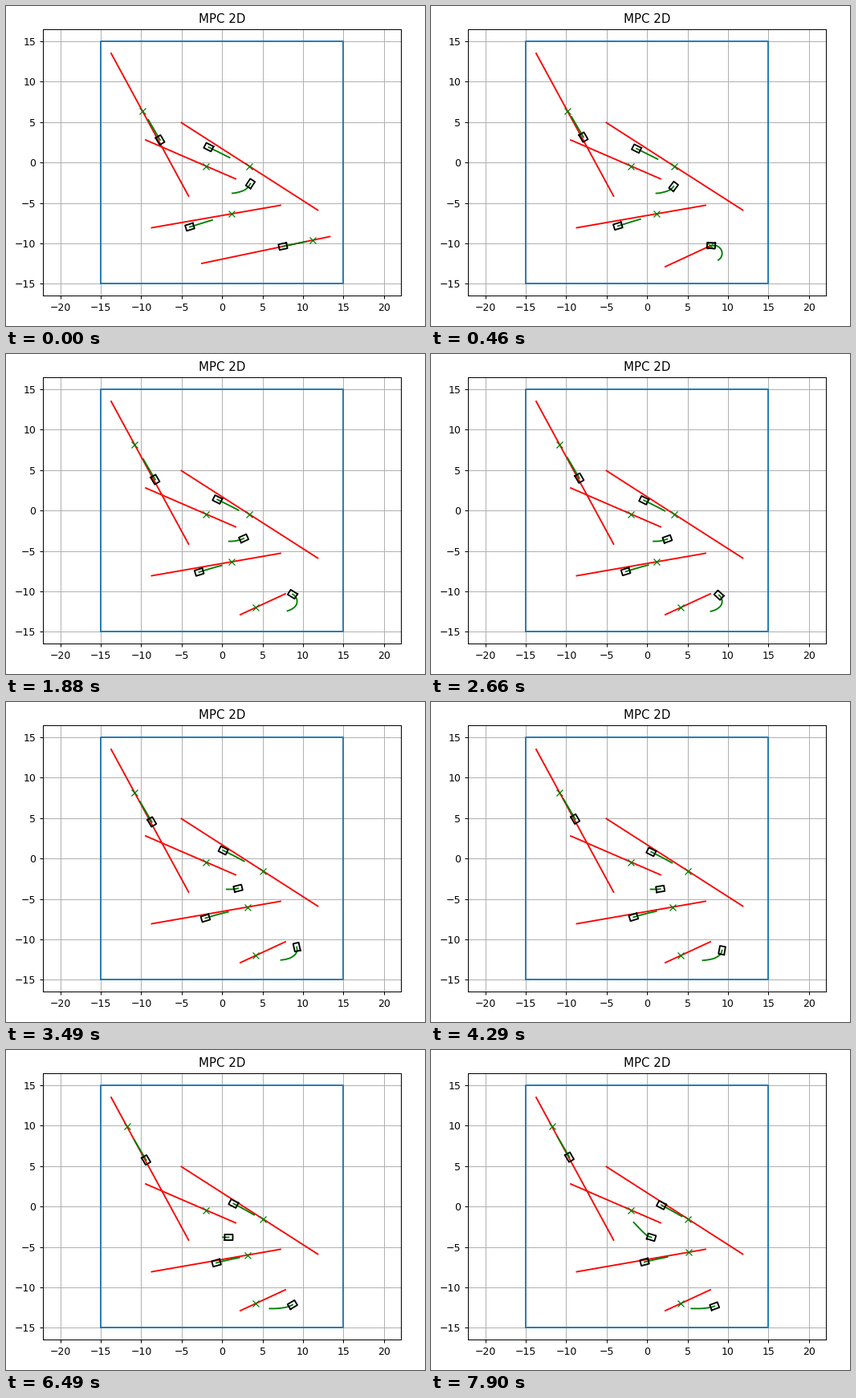
Recreate the animation shown at these times as a matplotlib script. Size 522x399 px, loop 8000 ms.

```python
import numpy as np
import matplotlib.pyplot as plt
from matplotlib.animation import FuncAnimation

W, H, DPI = 522, 399, 90
LOOP, TICK = 8000, 40
STEPS = 20
SPEED, HORIZON = 0.202, 2.9      # travel per step, length of the predicted path
SPACING, NEAR = 2.0, 3.7         # waypoint spacing, distance that picks the next one
LENGTH, WIDTH = 1.0, 0.7

# The solver slows down towards the end, so steps come at uneven times (ms)
step_times = np.interp(np.arange(1, STEPS), [1, 6, 14, 17, 19],
                       [50, 1880, 5110, 6490, 7900])


def smooth(points):
    """Curve through the points, with the distance travelled along it."""
    p = np.array(points, float)
    m = np.gradient(p, axis=0)
    t = np.linspace(0, 1, 40)[:, None]
    curve = np.vstack([
        (1 + 2 * t) * (1 - t) ** 2 * a + t * (1 - t) ** 2 * ma
        + t * t * (3 - 2 * t) * b + t * t * (t - 1) * mb
        for a, b, ma, mb in zip(p, p[1:], m, m[1:])])
    dist = np.r_[0, np.cumsum(np.hypot(*np.diff(curve, axis=0).T))]
    return curve, dist


def outline(center, heading):
    c, s = np.cos(heading), np.sin(heading)
    box = np.array([[1, 1], [1, -1], [-1, -1], [-1, 1], [1, 1]]) * [LENGTH / 2, WIDTH / 2]
    return box @ np.array([[c, s], [-s, c]]) + center


def drive(first, last, route, goal, track, braking=False):
    """States (route, goal, plan, body) for the steps first..last-1."""
    route = np.array(route)
    ahead = route[1] - route[0]
    ahead = ahead / np.hypot(*ahead)
    curve, dist = smooth(track)
    states = []
    for n in range(last - first):
        s = 0.21 * n - 0.0016 * n * n if braking else SPEED * n
        tip = min(s + HORIZON, 2.65 + 0.07 * n) if braking else s + HORIZON
        span = np.linspace(s, tip, 25)
        plan = np.column_stack([np.interp(span, dist, axis) for axis in curve.T])
        dx, dy = plan[1] - plan[0]

        mark = route[0] + ahead * SPACING * goal
        if n and np.hypot(*(mark - plan[0])) < NEAR:
            goal += 1
            mark = mark + ahead * SPACING
        states.append((route, mark[None], plan, outline(plan[0], np.arctan2(dy, dx))))
    return states


crossing = [(1.67, -2.02), (-9.44, 2.79)]
robots = [
    drive(0, STEPS, [(-4.14, -4.15), (-13.71, 13.5)], 6,
          [(-7.66, 2.79), (-11.09, 8.66)]),
    drive(0, STEPS, [(-5.03, 4.93), (11.83, -5.89)], 5,
          [(-1.66, 1.90), (1.82, 0.15), (4.35, -1.25)]),
    drive(0, STEPS, [(-8.70, -8.07), (7.22, -5.29)], 5,
          [(-3.99, -7.97), (-0.37, -6.88), (2.55, -6.23)]),
    # brakes into the corner, then plans a way back to its route
    drive(0, 19, crossing, 2,
          [(3.50, -2.61), (3.15, -3.11), (2.66, -3.46), (1.91, -3.70),
           (1.27, -3.80), (0.0, -3.80)], braking=True)
    + drive(19, STEPS, crossing, 2,
            [(0.53, -3.80), (0.0, -3.60), (-0.80, -2.85), (-1.80, -1.80)]),
    # reaches the end of its route and turns round for a new one
    drive(0, 2, [(-2.50, -12.48), (13.32, -9.16)], 7,
          [(7.52, -10.37), (11.40, -9.57)])
    + drive(2, STEPS, [(7.82, -10.30), (2.26, -12.88)], 0,
            [(7.92, -10.27), (8.71, -10.35), (9.23, -10.95), (9.13, -11.74),
             (8.31, -12.34), (6.90, -12.60), (5.30, -12.62)]),
]

fig = plt.figure(figsize=(W / DPI, H / DPI), dpi=DPI, facecolor="white")
ax = fig.add_axes([46 / W, 37.52 / H, 446.4 / W, 332.64 / H])
ax.set_xlim(-22.143, 22.143)
ax.set_ylim(-16.5, 16.5)
ax.set_xticks(range(-20, 21, 5))
ax.set_yticks(range(-15, 16, 5))
ax.grid(True)
ax.set_title("MPC 2D")
ax.plot([-15, 15, 15, -15, -15], [-15, -15, 15, 15, -15], color="tab:blue")

lines = [[ax.plot([], [], style)[0] for style in ("-r", "xg", "-g", "-k")]
         for _ in robots]


def update(i):
    now = (i + 1) * TICK - 1
    step = np.searchsorted(step_times, now, side="right")
    for states, group in zip(robots, lines):
        for line, points in zip(group, states[step]):
            line.set_data(*points.T)
    return [line for group in lines for line in group]


anim = FuncAnimation(fig, update, frames=LOOP // TICK, interval=TICK,
                     repeat=True, repeat_delay=0)
plt.show()
```
